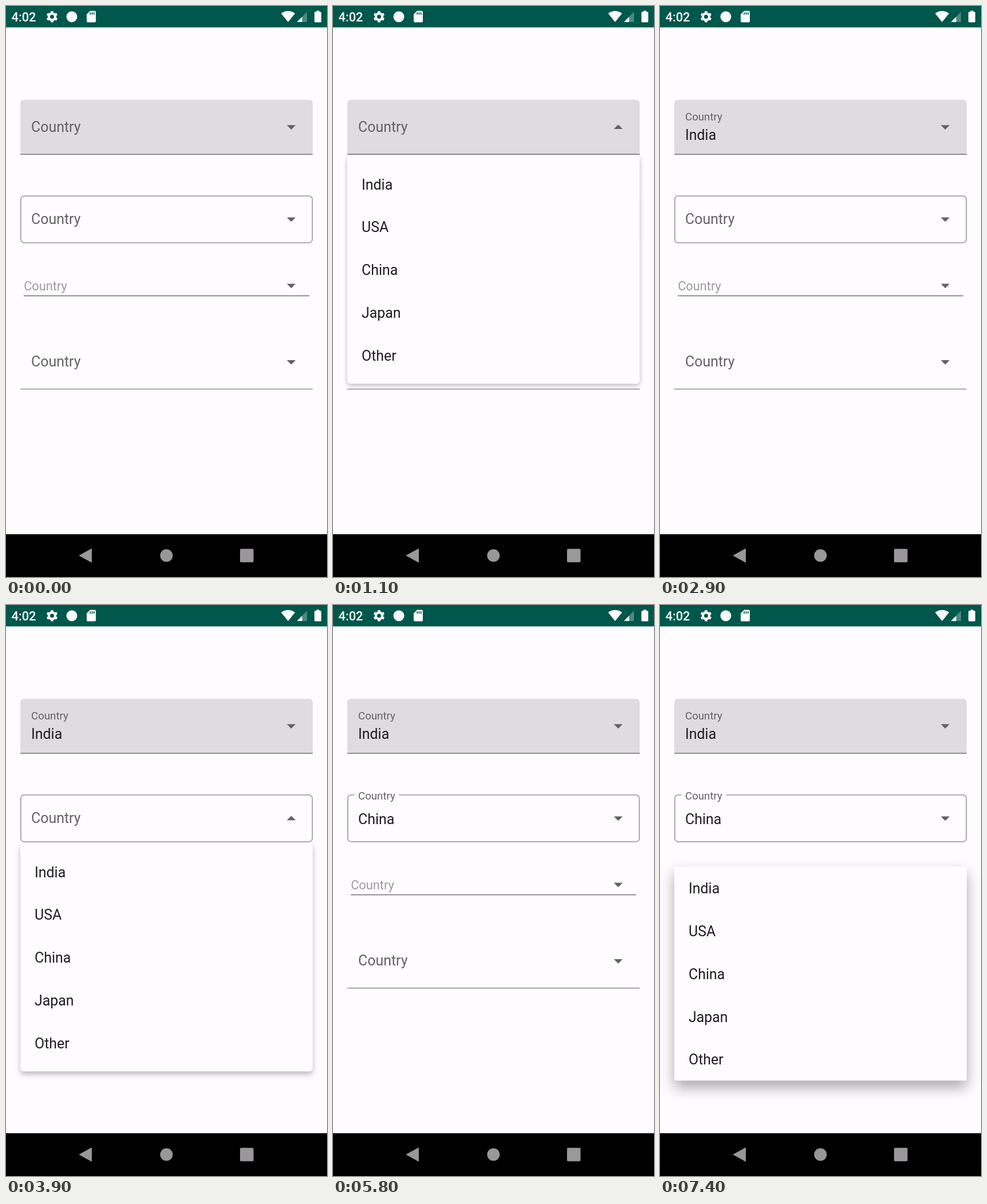
These frames come from a looping animation (561x998 px, 8 s). An HTML page:

```html
<!DOCTYPE html>
<html lang="en">
<head>
<meta charset="utf-8">
<title>Country pickers</title>
<style>
  html, body { margin: 0; width: 100%; height: 100%; overflow: hidden; background: #fefcff; }
  svg { display: block; }
  text { font-family: Roboto, sans-serif; white-space: pre; }
</style>
</head>
<body>
<svg id="stage" width="561" height="998" viewBox="0 0 561 998"></svg>
<script>
const LOOP = 8000, STEP = 100;
const PAPER = '#fefcff', INK = '#1d1c1e', HINT = '#626163', BAR = '#00574b';
const BODY = 24.93, SMALL = 18.7, ROW = 74.8;
const COUNTRIES = ['India', 'USA', 'China', 'Japan', 'Other'];

const ramp = (t, a, b) => Math.min(1, Math.max(0, (t - a) / (b - a)));
const mix = (a, b, k) => a + (b - a) * k;
const easeOut = k => 1 - (1 - k) ** 2;

const text = (s, x, y, size = BODY, fill = INK, weight = 400) =>
  `<text x="${x}" y="${y}" font-size="${size}" fill="${fill}" font-weight="${weight}">${s}</text>`;
const rect = (x, y, w, h, fill, r = 0, extra = '') =>
  `<rect x="${x}" y="${y}" width="${w}" height="${h}" rx="${r}" fill="${fill}" ${extra}/>`;
const circle = (x, y, r, fill, extra = '') =>
  `<circle cx="${x}" cy="${y}" r="${r}" fill="${fill}" ${extra}/>`;
const path = (d, fill, extra = '') => `<path d="${d}" fill="${fill}" ${extra}/>`;

const arrow = (y, up = false) => path(up
  ? `M490.8 ${y + 3.2}h15.4l-7.7-7.7z`
  : `M490.8 ${y - 3.4}h15.4l-7.7 7.7z`, HINT);

// Label that shrinks and rises from y0 to y1 as k goes from 0 to 1.
const label = (y0, y1, k) => text('Country', 44, mix(y0, y1, k), mix(BODY, SMALL, k), HINT);

const touch = (t, y, start) => {
  const k = ramp(t, start - 50, start + 300);
  return k > 0 && k < 1
    ? circle(498.5, y, mix(18, 29, easeOut(k)), '#000', `opacity="${0.12 * (1 - k)}"`) : '';
};

const statusBar = rect(0, 0, 561, 37.4, BAR)
  + text('4:02', 9.5, 27, 21.8, '#fff', 500)
  // gear: ring plus six teeth
  + circle(80.5, 18.7, 5.6, 'none', 'stroke="#fff" stroke-width="4.2"')
  + circle(80.5, 18.7, 8.1, 'none',
      'stroke="#fff" stroke-width="3.4" pathLength="6" stroke-dasharray=".5 .5" stroke-dashoffset="-.25"')
  + circle(115, 18.7, 9.5, '#fff')
  // memory card
  + path('M147 8.6h8a2 2 0 0 1 2 2v15.8a2 2 0 0 1-2 2h-12a2 2 0 0 1-2-2V14.6z', '#fff')
  + [146.4, 149.7, 153].map(x => rect(x, 11, 1.7, 4.2, BAR)).join('')
  // wifi, signal, battery
  + path('M493 28L480.8 13Q493 4.6 505.2 13z', '#fff')
  + path('M508.5 28L526 10V28z', '#fff', 'opacity=".3"')
  + path('M508.5 28L517.5 18.8V28z', '#fff')
  + rect(539, 10.3, 12, 18.2, '#fff', 1.4) + rect(542.5, 8.2, 5, 3, '#fff');

const navBar = rect(0, 923.2, 561, 75, '#000')
  + path('M128.5 960.5L149.3 949V972z', '#999799', 'stroke="#999799" stroke-width="1.4" stroke-linejoin="round"')
  + circle(280.4, 960.5, 11, '#999799')
  + rect(409, 948.8, 23.6, 23.4, '#999799', 2);

const menus = [
  { top: 261, pad: 12.6, open: 800, shown: 1100, press: 2600, pick: 0, close: 2700, gone: 2900, shadow: '0 3px 4px #0004' },
  { top: 416, pad: 12.6, open: 3600, shown: 3900, press: 4900, pick: 2, close: 5100, gone: 5300, shadow: '0 5px 5px #0004' },
  { top: 457.3, pad: 0, open: 6200, shown: 6600, press: LOOP, pick: 0, close: LOOP, gone: LOOP + 200, shadow: '0 12px 12px #0005' },
];

function menu(t, m) {
  if (t < m.open || t >= m.gone) return '';
  const grow = easeOut(ramp(t, m.open - 50, m.shown));
  const fade = Math.min(1, grow * 1.25) * (1 - ramp(t, m.close - 70, m.gone));
  const full = ROW * 5 + m.pad * 2, height = mix(ROW, full, grow);
  const pressed = t >= m.press
    ? `<svg y="${m.pad + m.pick * ROW}" width="511" height="${ROW}">`
      + circle(255.7, ROW / 2, 178 + (t - m.press) * 0.8, '#e5e5e5') + '</svg>' : '';
  const rows = COUNTRIES.map((c, i) => text(c, 25, m.pad + i * ROW + 46.9)).join('');
  return `<g opacity="${fade}">`
    + rect(25, m.top, 511, height, PAPER, m.pad ? 6 : 3, `style="filter:drop-shadow(${m.shadow})"`)
    + `<svg x="25" y="${m.top}" width="511" height="${height}">${pressed}${rows}</svg></g>`;
}

const isOpen = (t, m) => t >= m.open + 100 && t < m.close;

function filledField(t) {
  const m = menus[0], k = easeOut(ramp(t, m.close - 50, m.gone));
  return path('M25 260V170a6 6 0 0 1 6-6H530a6 6 0 0 1 6 6V260z', '#dedcdf')
    + rect(25, 258.5, 511, 1.5, '#757476')
    + label(219.7, 199.7, k)
    + (t >= m.close ? text('India', 44, 234.2) : '')
    + touch(t, 211, m.open) + arrow(211.7, isOpen(t, m));
}

function outlinedField(t) {
  const m = menus[1], k = easeOut(ramp(t, m.close - 50, m.gone));
  return rect(25.8, 332, 509.6, 81.7, 'none', 6, 'stroke="#959496" stroke-width="1.6"')
    + (k ? rect(mix(76, 37.5, k), 330, 78 * k, 4, PAPER) : '')
    + label(381.2, 340.4, k)
    + (t >= m.close ? text('China', 44, 382.8) : '')
    + touch(t, 372, m.open) + arrow(373, isOpen(t, m));
}

const plainFields = text('Country', 31.2, 496.8, 21.8, '#9b9a9c')
  + rect(31, 505.7, 499, 1.6, '#757476') + arrow(489)
  + text('Country', 44, 630.2, BODY, HINT)
  + rect(25, 668.8, 511, 1.6, '#949395') + arrow(622.5);

const stage = document.getElementById('stage');
let last = -1;

function frame(now) {
  const t = Math.floor(now % LOOP / STEP) * STEP;
  if (t !== last) {
    last = t;
    stage.innerHTML = rect(0, 0, 561, 998, PAPER) + filledField(t) + outlinedField(t)
      + plainFields + menus.map(m => menu(t, m)).join('') + statusBar + navBar;
  }
  requestAnimationFrame(() => frame(performance.now()));
}
frame(performance.now());
</script>
</body>
</html>
```
